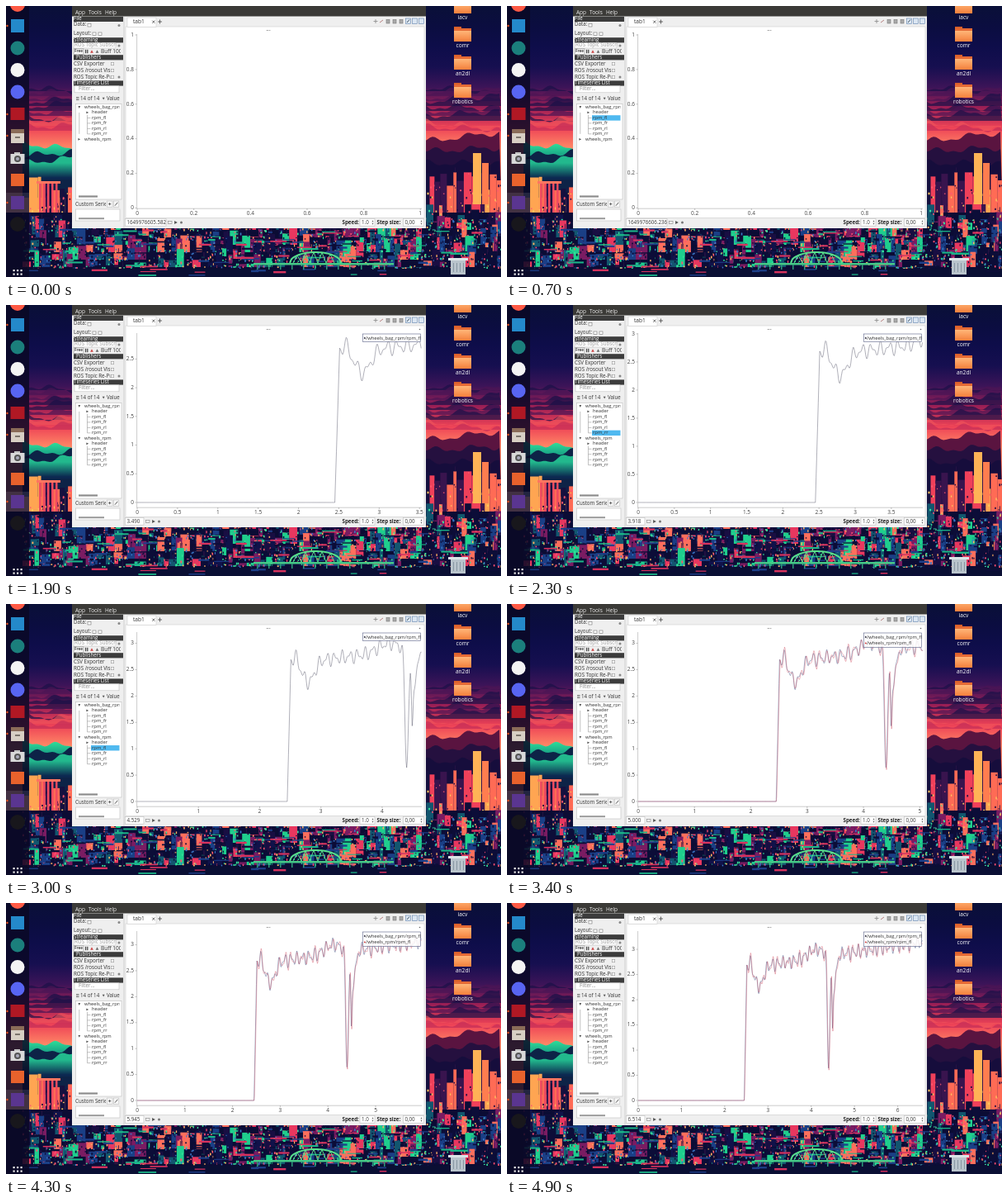
An HTML page with a canvas that plays this animation: 600 px wide and 328 px high, repeating every 5000 ms.

```html
<!DOCTYPE html>
<html lang="en">
<head>
<meta charset="utf-8">
<style>
html, body { margin: 0; width: 100%; height: 100%; overflow: hidden; background: #0b0f3c; }
canvas { display: block; width: 600px; height: 328px; }
</style>
</head>
<body>
<canvas id="stage"></canvas>
<script>
const W = 600, H = 328, LOOP = 5000;
const ratio = window.devicePixelRatio || 1;
const stage = document.getElementById('stage');
const FONT = '"Open Sans", "Noto Sans", sans-serif';
let g;

function setup(canvas) {
  canvas.width = W * ratio;
  canvas.height = H * ratio;
  const c = canvas.getContext('2d');
  c.scale(ratio, ratio);
  c.textBaseline = 'middle';
  return c;
}
function box(x, y, w, h, fill, border) {
  g.fillStyle = fill;
  g.fillRect(x, y, w, h);
  if (border) {
    g.strokeStyle = border;
    g.lineWidth = .6;
    g.strokeRect(x, y, w, h);
  }
}
function disc(x, y, r, fill) {
  g.fillStyle = fill;
  g.beginPath();
  g.arc(x, y, r, 0, 7);
  g.fill();
}
function line(color, width, ...p) {
  g.strokeStyle = color;
  g.lineWidth = width;
  g.beginPath();
  for (let i = 0; i < p.length; i += 2) g.lineTo(p[i], p[i + 1]);
  g.stroke();
}
// small triangle pointing along (dx, dy)
function arrow(x, y, dx, dy, r = 1.4, color = '#555') {
  g.fillStyle = color;
  g.beginPath();
  g.moveTo(x + dx * r, y + dy * r);
  g.lineTo(x - dx * r + dy * r, y - dy * r + dx * r);
  g.lineTo(x - dx * r - dy * r, y - dy * r - dx * r);
  g.fill();
}
function text(s, x, y, color = '#333', size = 6.2, align = 'left', weight = 400) {
  g.font = `${weight} ${size}px ${FONT}`;
  g.textAlign = align;
  g.fillStyle = color;
  g.fillText(s, x, y);
}
function clipped(x, y, w, h, draw) {
  g.save();
  g.beginPath();
  g.rect(x, y, w, h);
  g.clip();
  draw();
  g.restore();
}
function shade(y0, y1, ...colors) {
  const s = g.createLinearGradient(0, y0, 0, y1);
  colors.forEach((c, i) => s.addColorStop(i / (colors.length - 1), c));
  return s;
}

// ---------- wallpaper ----------
let seed = 29;
const rnd = () => (seed = (seed * 16807) % 2147483647) / 2147483647;
const range = (a, b) => a + rnd() * (b - a);
const pick = list => list[Math.floor(rnd() * list.length)];

// rolling layer from a wavy top edge down to y + h
function ridge(x0, x1, y, h, slope, fill) {
  g.fillStyle = fill;
  g.beginPath();
  g.moveTo(x0, y + h);
  for (let x = x0; x <= x1; x += 3)
    g.lineTo(x, y + slope * (x - x0) + 3 * Math.sin(x * .13 + y) + 1.5 * Math.sin(x * .31 + y * 2));
  g.lineTo(x1, y + h);
  g.fill();
}
function skyline(x0, x1, top, base, colors, lights) {
  for (let x = x0; x < x1;) {
    const w = range(3, 11), y = top + range(0, 24);
    box(x, y, w, base - y, pick(colors));
    if (rnd() < .3) box(x + w / 2, y - 6, .8, 6, '#2a1446');
    for (let k = 0; k < 5; k++) box(x + range(0, w - 1), range(y, base), range(1, 2), range(1, 3), pick(lights));
    x += w;
  }
}
function wallpaper() {
  box(0, 0, W, H, shade(0, 172, '#0a1038', '#0b0d40', '#0e0d4a', '#160f50', '#3c1458', '#9c1f55', '#ee4356', '#ff8866'));
  for (let i = 0; i < 9; i++) {
    const c = pick(['#1a1048b0', '#4a1555b0', '#c02a58a0', '#f2555ca0']);
    ridge(28, 82, 98 + i * 6, 5, range(-.1, .15), c);
    ridge(505, 600, 98 + i * 6, 5, range(-.1, .1), c);
  }
  // green hills on the left, dark ones on the right
  ridge(20, 82, 166, 50, .12, shade(166, 205, '#2fe09a', '#12907f', '#0d2a4c'));
  ridge(20, 82, 182, 50, -.1, '#0d2347');
  ridge(20, 82, 190, 20, -.1, shade(190, 208, '#22b98d', '#0c2850'));
  ridge(505, 600, 164, 60, -.12, '#5a1440');
  ridge(505, 600, 176, 60, -.05, '#25103f');
  ridge(505, 600, 190, 60, 0, '#160d3c');
  const warm = ['#ff6b55', '#f0405a', '#ffa552', '#39144e', '#15103f'];
  const lights = ['#ffc860', '#2a1046', '#ff5a70', '#160d3c'];
  skyline(28, 82, 206, 268, [...warm, '#15103f'], lights);
  skyline(505, 600, 200, 262, warm, lights);
  box(566, 178, 10, 62, '#ffb356');
  box(577, 190, 8, 50, '#ff7d4f');
  box(37, 212, 29, 3, '#ff7560');
  for (let x = 40; x < 65; x += 5) box(x, 215, 2.5, 38, '#f04a60');

  // the town below: overlapping rows of buildings
  box(0, 250, W, 78, '#0b0c34');
  const town = ['#0c0d38', '#0c0d38', '#10124a', '#190e42', '#0c0d38', '#1a3f86', '#e8375f', '#1fce8d', '#7a1c62', '#ff6f5c', '#12566f'];
  const windows = ['#ff5072', '#35e29a', '#3a78c8', '#0c0d38', '#0c0d38', '#ffb060'];
  for (let y = 246; y < 308; y += 9) skyline(20, W, y - 6, y + 16, town, windows);
  box(20, 318, W, 10, '#0a0f34');
  for (let i = 0; i < 150; i++)
    box(range(20, 600), range(268, 326), range(5, 22), range(1, 2.5), pick(['#0c0d38', '#0c0d38', '#1bb587', '#d8325e', '#1d3f88']));

  // arched bridge with a zigzag truss
  const arch = (x, rise) => 311 - rise * Math.sqrt(Math.max(0, 1 - ((x - 375) / 31) ** 2));
  box(300, 311, 170, 2.5, '#45c987');
  const top = [], truss = [];
  for (let x = 344; x <= 406; x += 2) top.push(x, arch(x, 13));
  for (let x = 348, i = 0; x <= 402; x += 5, i++) truss.push(x, i % 2 ? arch(x, 13) : 311);
  line('#58e08c', 2, ...top);
  line('#58e08c', 1, ...truss);
  for (let x = 304; x < 470; x += 14) box(x, 313, 1.5, 6, '#2c9a78');
}

// ---------- desktop ----------
function dock() {
  box(0, 0, 28, H, 'rgba(10,9,38,.86)');
  box(0, 226, 28, 24, 'rgba(255,255,255,.1)');
  disc(14, -2, 9, '#ff5a45');
  box(6, 16, 16, 16, '#2489ca');
  ['#1b7f7c', '#f4f4f4', '#5865f2'].forEach((c, i) => disc(14, 51 + i * 26.5, 8.5, c));
  box(5.5, 123, 17, 15, '#b01824');
  box(6, 149, 16, 17, '#d8cfc4');
  box(6, 149, 16, 5, '#8a6b58');
  box(11, 158, 6, 2, '#7c746c');
  box(10, 177, 7, 3, '#c4c4c4');
  box(5.5, 179, 17, 12, '#d9d9d9');
  disc(14, 185, 4, '#555');
  disc(14, 185, 2, '#aab');
  box(6, 203, 16, 15, '#e8622c');
  box(6, 230, 16, 16, '#5a3590');
  disc(14, 264, 9, '#18171c');
  for (const y of [24, 131, 157, 238]) disc(1.5, y, 1.2, '#e95420');
  for (let i = 0; i < 9; i++) box(8.5 + i % 3 * 4.5, 319 + Math.floor(i / 3) * 4.5, 2.2, 2.2, '#eee');
}
function folders() {
  ['iacv', 'comr', 'an2dl', 'robotics'].forEach((name, i) => {
    const y = -8 + i * 34;
    box(543, y - 1, 9, 4, '#d9602a');
    box(543, y + 1, 21, 16, '#e56a35');
    box(543, y + 4, 21, 13, shade(y + 4, y + 17, '#ffb679', '#f4803c'));
    text(name, 553.5, 14.5 + i * 34, '#fff', 6.6, 'center');
  });
  box(539, 308, 18, 17, '#b9c4cc');
  box(536, 305, 24, 3, '#dbe3e6');
  for (let x = 542; x < 556; x += 4) box(x, 311, 1, 11, '#8796a2');
}

// ---------- application window ----------
function header(label, y, x = 82) {
  box(82, y - 3, 60, 6.2, '#3c3c3c');
  text(label, x, y - .3, '#fff');
}
function field(x, y, w, h, label = '', fill = '#fff') {
  box(x, y, w, h, fill, '#c0c0c0');
  text(label, x + 2, y + h / 2 + .2);
}
function cross(x, y, r, angle, color = '#444') {
  for (const a of [angle, angle + Math.PI / 2])
    line(color, .8, x - r * Math.cos(a), y - r * Math.sin(a), x + r * Math.cos(a), y + r * Math.sin(a));
}
function sidebar() {
  header('File', 15.8);
  text('Data:', 82, 22.8);
  text('Layout:', 82, 33.3);
  for (const [x, y] of [[99, 21.5], [105, 32], [112, 32]]) box(x, y, 4, 3.5, '#fff', '#777');
  header('Streaming', 41.2);
  clipped(81, 44, 52.5, 8, () => {
    field(82, 44.5, 51, 6.5);
    text('ROS Topic Subscriber', 83, 47.8, '#999');
  });
  box(82, 51.8, 12, 6.5, '#fafafa', '#888');
  text('Free', 88, 55, '#444', 4.6, 'center', 700);
  for (const x of [96, 98.2]) box(x, 52.8, 1.2, 4.4, '#444');
  arrow(104, 55, 0, -1, 1.8, '#c44');
  arrow(110.5, 55, 0, -1, 1.8, '#666');
  clipped(114, 51, 25, 8, () => text('Buff 100', 115, 54.8, '#333', 6.5));
  header('Publishers', 62.2, 85);
  ['CSV Exporter', 'ROS /rosout Visualizer', 'ROS Topic Re-Publisher'].forEach((label, i) => {
    const y = 70 + i * 8;
    clipped(82, y - 5, 44.5, 10, () => text(label, 82, y));
    box(127.3, y - 1.7, 3.4, 3.4, '#fff', '#999');
  });
  for (const y of [23.5, 48, 86]) disc(137, y, 1.5, '#888');
  header('Timeseries List', 93.4);
  field(83, 96.8, 54, 8);
  text('Filter...', 88, 100.8, '#8a8a8a');
  for (let i = 0; i < 3; i++) box(85, 110 + i * 1.7, 3.5, .7, '#555');
  text('14 of 14', 90, 112);
  arrow(118.2, 112.2, 0, 1);
  text('Value', 122, 112);
  field(84.5, 118.5, 55.5, 115.5);
  box(88, 229.4, 23, 2.2, '#8d8d8d');
  clipped(82, 235, 39, 9, () => text('Custom Series', 84, 240));
  for (const x of [122.5, 130.3]) field(x, 236, 6.5, 7.5, '', '#f8f8f8');
  cross(125.7, 239.7, 1.6, 0);
  line('#444', .9, 132, 241.7, 135.3, 237.8);
  field(84.5, 246, 53.5, 14);
  box(88, 256.2, 31, 2, '#999');
  line('#c4c4c4', .7, 143, 13, 143, 269);
}
function appWindow() {
  box(80, 0, 429, 269, '#efefef');
  box(80, 0, 429, 12.5, '#3b3a37');
  text('App', 84, 8, '#eee', 6.5);
  text('Tools', 100, 8, '#eee', 6.5);
  text('Help', 120, 8, '#eee', 6.5);
  sidebar();

  box(145, 25, 362, 231.5, '#fff', '#ccc');
  box(147, 14, 35, 11.3, '#fff', '#ccc');
  text('tab1', 154, 19.3, '#333', 6.6);
  cross(178.8, 19.2, 2.2, Math.PI / 4);
  cross(186.5, 19, 2.5, 0);
  cross(448, 18.5, 2.5, 0, '#888');
  line('#a66', .8, 453, 20, 457, 17);
  for (let i = 0; i < 3; i++) box(461 + i * 8, 16.5, 4, 4.5, '#aaa', '#777');
  for (let i = 0; i < 3; i++) box(484.5 + i * 8, 15, 6, 6.5, '#dbe6f2', '#5f82ad');
  line('#345', .9, 486, 20, 489, 16.5);
  text('...', 318, 28.5, '#333', 6.6, 'center');

  text('Speed:', 407.5, 262, '#222', 6.2, 'left', 700);
  field(429, 257.6, 18, 8.6, '1.0');
  text('Step size:', 449.5, 262, '#222', 6.2, 'left', 700);
  field(481.5, 257.6, 25, 8.6, '0,00');
  for (const x of [444.5, 503.5]) {
    arrow(x, 260.2, 0, -1, 1, '#666');
    arrow(x, 263.8, 0, 1, 1, '#666');
  }
}

// ---------- series ----------
const START = 2.45;
const bump = (t, at, width) => Math.exp(-(((t - at) / width) ** 2));
function wheel(t) {
  const rise = Math.min(1, Math.max(0, (t - START) / .06));
  const trend = 2.62 + .13 * (t - 2.5) + .17 * bump(t, 4.1, .25);
  const start = .15 * bump(t, 2.58, .05) - .4 * bump(t, 2.8, .13);
  const dip = 2.2 * bump(t, 4.4, .04) + 1.1 * bump(t, 4.49, .018) + .6 * bump(t, 4.53, .07);
  const wiggle = .09 * Math.cos(50.6 * (t - 3.1)) + .06 * Math.sin(83 * t);
  return rise * (trend + start - dip + wiggle);
}
const echo = t => wheel(t - .008) + (t > START + .07 ? .05 * Math.sin(61 * t) : 0);

function peak(end) {
  let top = 0;
  for (let t = START; t < end; t += .01) top = Math.max(top, wheel(t));
  return top;
}

// ---------- moving parts ----------
const DROP_1 = 1100, EXPAND = 1900, DROP_2 = 3400;
// playback clock: [ms, seconds]
const CLOCK = [[0, 1.6], [700, 2.254], [1400, 2.955], [2300, 3.918], [3000, 4.529], [3800, 5.471], [4900, 6.514]];
function clockAt(t) {
  const i = Math.max(1, CLOCK.findIndex(k => k[0] >= t));
  const [t0, v0] = CLOCK[i - 1], [t1, v1] = CLOCK[i];
  return v0 + (v1 - v0) * (t - t0) / (t1 - t0);
}
const HOVER = [{ from: 500, to: 1000, row: 2 }, { from: 2200, to: 2400, row: 5 }, { from: 2500, to: 3200, row: 8 }];

function tree(t) {
  const rowY = i => 122.5 + i * 6.47;
  const names = ['header', 'rpm_fl', 'rpm_fr', 'rpm_rl', 'rpm_rr'];
  const hit = HOVER.find(h => t >= h.from && t < h.to);
  clipped(85, 119, 52.5, 105, () => {
    if (hit) box(103, rowY(hit.row) - 3.2, 40, 6.4, '#4fb9f0');
    line('#999', .6, 88.8, rowY(1), 88.8, rowY(5));
    ['wheels_bag_rpm', 'wheels_rpm'].forEach((group, n) => {
      const top = n * 6, open = !n || t >= EXPAND;
      text(group, 95, rowY(top), '#333', 5.8);
      arrow(88.8, rowY(top), open ? 0 : 1, open ? 1 : 0);
      if (!open) return;
      names.forEach((name, i) => {
        const y = rowY(top + i + 1);
        text(name, 104, y, '#333', 5.8);
        if (i) line('#999', .6, 98.5, y, 102.5, y);
        else arrow(98.8, y, 1, 0);
      });
      line('#999', .6, 98.5, rowY(top + 1) + 3, 98.5, rowY(top + 5));
    });
  });
}

function plot(t) {
  const live = t >= DROP_1, both = t >= DROP_2;
  const xMax = live ? 1.596 + 1.017 * t / 1000 : 1.005;
  const yMax = live ? peak(xMax) : 1;
  const px = v => 159 + v * 345 / xMax;
  const py = v => live ? 239 - v * 200 / yMax : 244.5 - v * 209.5;
  line('#aaa', .6, 158.6, 34, 158.6, 245.2, 504, 245.2);
  const xStep = !live ? .2 : xMax < 4 ? .5 : 1, yStep = live ? .5 : .2;
  const label = v => String(+v.toFixed(1));
  for (let v = 0; v <= xMax; v += xStep) {
    line('#999', .6, px(v), 245, px(v), 247);
    text(label(v), Math.min(px(v), 502), 251, '#444', 6.5, 'center');
  }
  for (let v = 0; v <= yMax * 1.025 + .001; v += yStep) {
    line('#999', .6, 156.5, py(v), 158.5, py(v));
    text(label(v), 155, py(v), '#444', 6.5, 'right');
  }
  if (!live) return;

  const curve = (f, color) => {
    const p = [];
    for (let v = 0; v < xMax; v += .01) p.push(px(v), py(f(v)));
    line(color, .6, ...p);
  };
  clipped(158, 34, 346, 211, () => {
    curve(wheel, both ? 'rgba(60,75,125,.75)' : 'rgba(80,80,100,.75)');
    if (both) curve(echo, 'rgba(205,70,90,.65)');
  });
  box(432.5, 35, 70, both ? 17.5 : 9.5, 'rgba(255,255,255,.85)', '#5a6288');
  const entry = (label, y, color) => {
    disc(434.8, y, .9, color);
    text(label, 436, y, '#333', 5.8);
  };
  entry('/wheels_bag_rpm/rpm_fl', 40, '#223');
  if (both) entry('/wheels_rpm/rpm_fl', 47.4, '#c33');
  disc(501.5, 29.5, .8, '#666');
}

function status(t) {
  const live = t >= DROP_1, end = live ? 167 : 194;
  const clock = clockAt(t) + (live ? 0 : 1649976603.982);
  field(144.5, 257.6, end - 144.5, 8.6, clock.toFixed(3));
  box(end + 2.5, 260.5, 4.5, 3, '#efefef', '#888');
  arrow(end + 12, 262, 1, 0, 1.9);
  disc(end + 18.5, 262, 1.5, '#777');
}

const scenery = document.createElement('canvas');
g = setup(scenery);
wallpaper();
dock();
folders();
appWindow();

g = setup(stage);
function frame() {
  const t = Math.floor(performance.now() % LOOP / 100) * 100;
  g.drawImage(scenery, 0, 0, W, H);
  tree(t);
  plot(t);
  status(t);
  requestAnimationFrame(frame);
}
frame();
</script>
</body>
</html>
```
